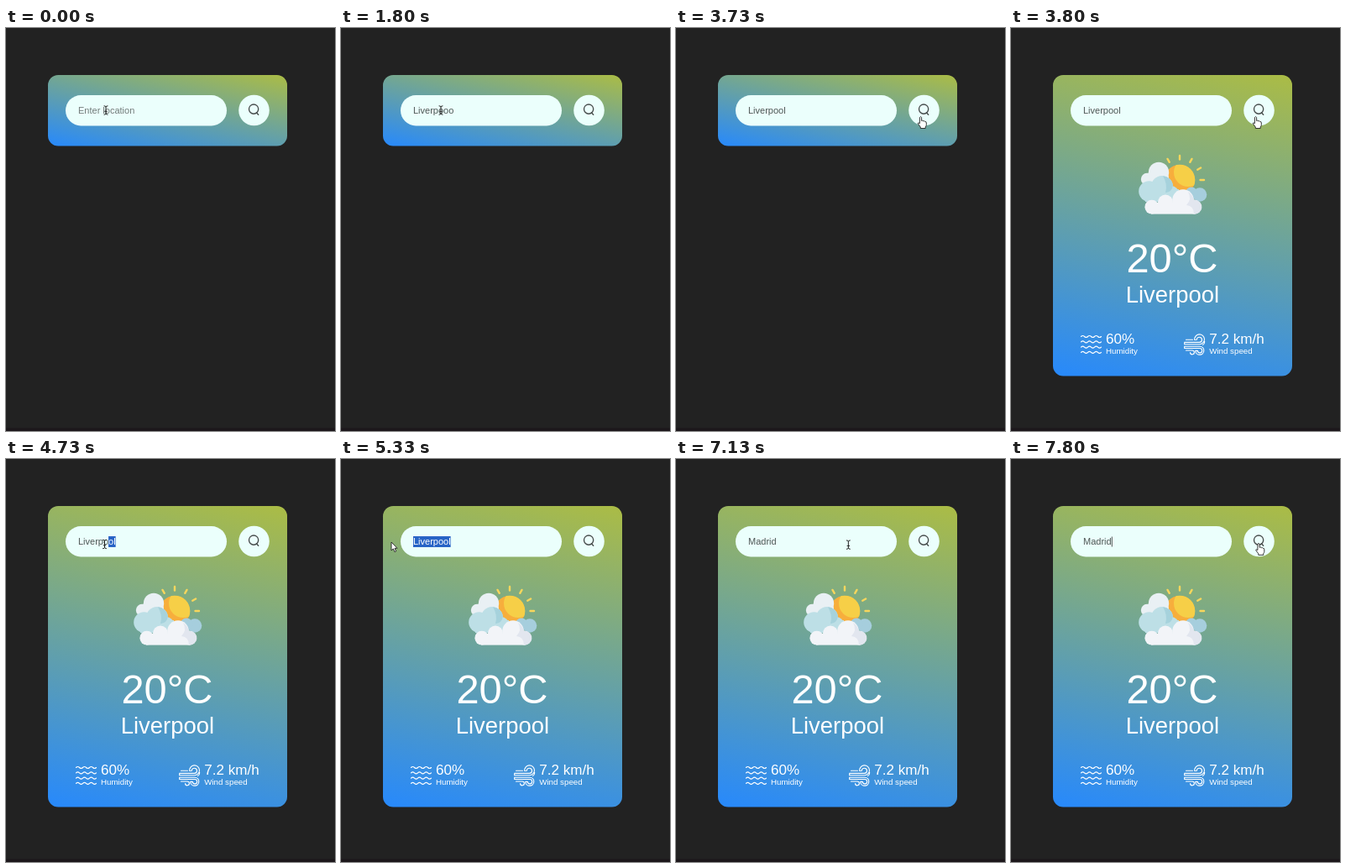
Recreate the animation shown at these times as an HTML page. Size 392x480 px, loop 8 s.

```html
<!DOCTYPE html>
<html lang="en">
<head>
<meta charset="utf-8">
<title>Weather search</title>
<style>
  html, body { margin: 0; width: 100%; height: 100%; overflow: hidden; background: #222; }
  svg { display: block; width: 392px; height: 480px; }
  text { font-family: "Liberation Sans", Arial, sans-serif; fill: #fff; }
  .field { font-size: 11px; }
  .line { fill: none; stroke: #fff; stroke-width: 1.15; stroke-linecap: round; stroke-linejoin: round; }
  .cursor { fill: #fff; stroke: #222; stroke-width: .9; stroke-linejoin: round; }
</style>
</head>
<body>
<svg viewBox="0 0 392 480">
  <defs>
    <linearGradient id="grad" gradientUnits="userSpaceOnUse">
      <stop offset="0" stop-color="#2789fc"/>
      <stop offset="1" stop-color="#abbc45"/>
    </linearGradient>
    <clipPath id="selClip"><rect id="clipBox" y="92" height="13"/></clipPath>
    <clipPath id="sunClip"><circle cx="201" cy="181" r="18.3"/></clipPath>
  </defs>

  <rect width="392" height="480" fill="#222"/>
  <rect y="476.5" width="392" height="3.5" fill="#1c171b"/>
  <rect id="card" x="50" y="56" width="285" rx="12.2" fill="url(#grad)"/>

  <rect x="71" y="80" width="192" height="36.4" rx="18.2" fill="#ebfffc"/>
  <circle cx="295.5" cy="98" r="18.3" fill="#ebfffc"/>
  <g fill="none" stroke="#454a4a" stroke-width="1.35" stroke-linecap="round">
    <circle cx="295.1" cy="96.6" r="5.6"/>
    <path d="M298.6 101l2.1 2.2"/>
  </g>

  <text id="hint" class="field" x="86" y="102" style="fill:#737b7a">Enter location</text>
  <text id="word" class="field" x="86" y="102" style="fill:#4f5655"></text>
  <rect id="sel" y="92" height="13" fill="#2864c6"/>
  <text id="picked" class="field" x="86" y="102" clip-path="url(#selClip)"></text>
  <rect id="caret" y="92.5" width=".9" height="12" fill="#444"/>

  <g id="weather">
    <g id="rays" stroke="#f7d65c" stroke-width="2.4" stroke-linecap="round"></g>
    <g clip-path="url(#sunClip)">
      <circle cx="201" cy="181" r="18.3" fill="#f7ae3c"/>
      <circle cx="211" cy="172" r="17" fill="#f6cf47"/>
    </g>
    <g fill="#e9f0f4">
      <circle cx="176" cy="172" r="12.2"/>
      <circle cx="162" cy="180" r="7.2"/>
      <rect x="160" y="172" width="28" height="15" rx="6"/>
    </g>
    <g fill="#a6cedd">
      <circle cx="225" cy="198.5" r="8.3"/>
      <circle cx="215" cy="197" r="7.5"/>
    </g>
    <g fill="#bddfe6">
      <circle cx="180" cy="189" r="13"/>
      <circle cx="164.5" cy="194.5" r="12.3"/>
      <circle cx="191" cy="197" r="9"/>
      <rect x="160" y="192" width="40" height="15"/>
    </g>
    <path d="M181 176.2a13 13 0 0 1 12 11q-1 8-9 9 3-10-3-20z" fill="#a6d2dc"/>
    <g fill="#f2f4f8">
      <circle cx="184" cy="207.5" r="9"/>
      <circle cx="205" cy="205" r="12.8"/>
      <circle cx="218.5" cy="213.2" r="8.4"/>
      <circle cx="167.8" cy="213.2" r="8.4"/>
      <rect x="167" y="208" width="52" height="13.6"/>
    </g>
    <path d="M211 195q5 9-2 16 9 1 9 10.6a8.4 8.4 0 0 0 2-16.7q-3-1-2.300-1-2-6-6.700-8.900z" fill="#e2e6ef"/>

    <text x="192" y="291" font-size="48.8" text-anchor="middle">20°C</text>
    <text x="192.400" y="327" font-size="27.450" text-anchor="middle">Liverpool</text>
    <text x="113" y="375.500" font-size="17.080">60%</text>
    <text x="113" y="388" font-size="9.760">Humidity</text>
    <text x="236.200" y="375.500" font-size="17.080">7.2 km/h</text>
    <text x="236.200" y="388" font-size="9.760">Wind speed</text>

    <path id="waves" class="line"/>
    <path class="line" d="M218.700 371.500a5.900 5.900 0 1 1 5.900 5.200H206.700v-2.300H224.500a3.100 3.100 0 1 0-3.200-3.200z
      M208.500 371.200h8M206.700 379.200H225a5 5 0 1 1-5.200 5.200h2.500a2.700 2.700 0 1 0 2.700-2.900H206.700z
      M208.500 384h7.500a2.400 2.400 0 1 1-2.400 2.600M228.500 377.500q2.200-1 2.200-4"/>
  </g>

  <g id="beam" fill="none" stroke-linecap="round">
    <path d="M-2-5.200Q0-5.200 0-4V4Q0 5.200-2 5.200M2-5.200Q0-5.200 0-4M0 4Q0 5.200 2 5.200M-1.300 1.300h2.600" stroke="#222" stroke-width="1"/>
  </g>
  <path id="arrow" class="cursor" d="M0 0V10L2.300 7.900 3.900 11.600 5.600 10.900 4 7.300H7Z"/>
  <path id="hand" class="cursor" d="M-1.100 1Q0-.8 1.100 1V5Q2.400 4.100 3.300 5.400 4.600 4.700 5.200 6 6.800 5.700 6.800 7.500V10Q6.600 11.500 5.700 12.400V14H-.200V12.500L-3.300 8.300Q-3.300 6.500-1.100 8.200Z"/>
</svg>

<script>
const LOOP = 8000, TICK = 1000 / 15, LEFT = 86;
const $ = id => document.getElementById(id);
const set = (id, attrs) => { for (const k in attrs) $(id).setAttribute(k, attrs[k]); };
const show = (id, on) => set(id, { visibility: on ? "visible" : "hidden" });

// [tick, text in the field]
const keys = [[0, ""]];
const type = (word, ticks) => ticks.forEach((k, i) => keys.push([k, word.slice(0, i + 1)]));
type("Liverpooo", [1, 6, 9, 12, 13, 14, 15, 17, 19]);
keys.push([29, "Liverpoo"], [32, "Liverpool"]);
type("Madrid", [88, 91, 93, 95, 97, 98]);

// [tick, x, y] of the pointer's hot spot
const path = [
  [0, 119, 98], [40, 119, 98], [52, 291.5, 105.5], [59, 291.5, 105.5],
  [65, 156, 101], [67, 155, 102], [70, 155, 102], [71, 117.5, 101.5],
  [75, 60, 99], [100, 60, 99], [112, 293, 104], [116, 295, 100.3], [120, 295, 100.3]
];
const OPEN = 57, BLUR = 53, DRAG = 70, RETYPE = 88, BLINK = 8;

function pointer(k) {
  let i = 0;
  while (i < path.length - 2 && path[i + 1][0] <= k) i++;
  const [a, ax, ay] = path[i], [b, bx, by] = path[i + 1];
  const u = Math.min(1, (k - a) / (b - a)), e = u * u * (3 - 2 * u);
  return [ax + (bx - ax) * e, ay + (by - ay) * e];
}

function sizeCard(h) {
  const w = 285, ang = 12 * Math.PI / 180, s = Math.sin(ang), c = Math.cos(ang);
  const half = (w * s + h * c) / 2, cx = 50 + w / 2, cy = 56 + h / 2;
  set("card", { height: h });
  set("grad", { x1: cx - s * half, y1: cy + c * half, x2: cx + s * half, y2: cy - c * half });
}

function drawField(k, x) {
  const [at, word] = keys.filter(e => e[0] <= k).pop();
  $("word").textContent = $("picked").textContent = word;
  show("hint", !word);
  const width = n => n ? $("word").getSubStringLength(0, n) : 0;
  const end = LEFT + width(word.length);
  const dragging = k > DRAG && k < RETYPE;
  let from = end;
  if (dragging) {
    let n = word.length;
    while (n > 0 && LEFT + (width(n) + width(n - 1)) / 2 > x + 3) n--;
    from = LEFT + width(n);
  }
  const span = { x: from, width: Math.max(0, end - from) };
  set("sel", span);
  set("clipBox", span);
  const focused = k < BLUR || k >= RETYPE;
  show("caret", word && focused && Math.floor((k - at) / BLINK) % 2 === 0);
  set("caret", { x: end + .2 });
}

function drawPointer(k, x, y) {
  const onButton = Math.hypot(x - 295.5, y - 98) < 18.3;
  const onField = x > 71 && x < 263;
  const kind = onButton ? "hand" : onField ? "beam" : "arrow";
  for (const id of ["hand", "beam", "arrow"]) show(id, id === kind);
  set(kind, { transform: `translate(${x} ${y})` });
}

function draw(ms) {
  const k = Math.floor((ms % LOOP + 5) / TICK) % 120;
  const [x, y] = pointer(k);
  const open = k >= OPEN;
  sizeCard(open ? 358.5 : 84.5);
  show("weather", open);
  drawField(k, x);
  drawPointer(k, x, y);
}

$("rays").innerHTML = [-120, -90, -60, -30, 0].map(d => {
  const a = d * Math.PI / 180, p = r => [201 + r * Math.cos(a), 181 + r * Math.sin(a)];
  const [x1, y1] = p(24.5), [x2, y2] = p(29);
  return `<line x1="${x1}" y1="${y1}" x2="${x2}" y2="${y2}"/>`;
}).join("");

set("waves", {
  d: [367.5, 373.8, 380.1, 386.4].map(y => `M83.500 ${y}q2 -2 4 0` + "t4 0".repeat(5)).join("")
});

const start = performance.now();
function frame() {
  draw(performance.now() - start);
  requestAnimationFrame(frame);
}
draw(0);
requestAnimationFrame(frame);
</script>
</body>
</html>
```
